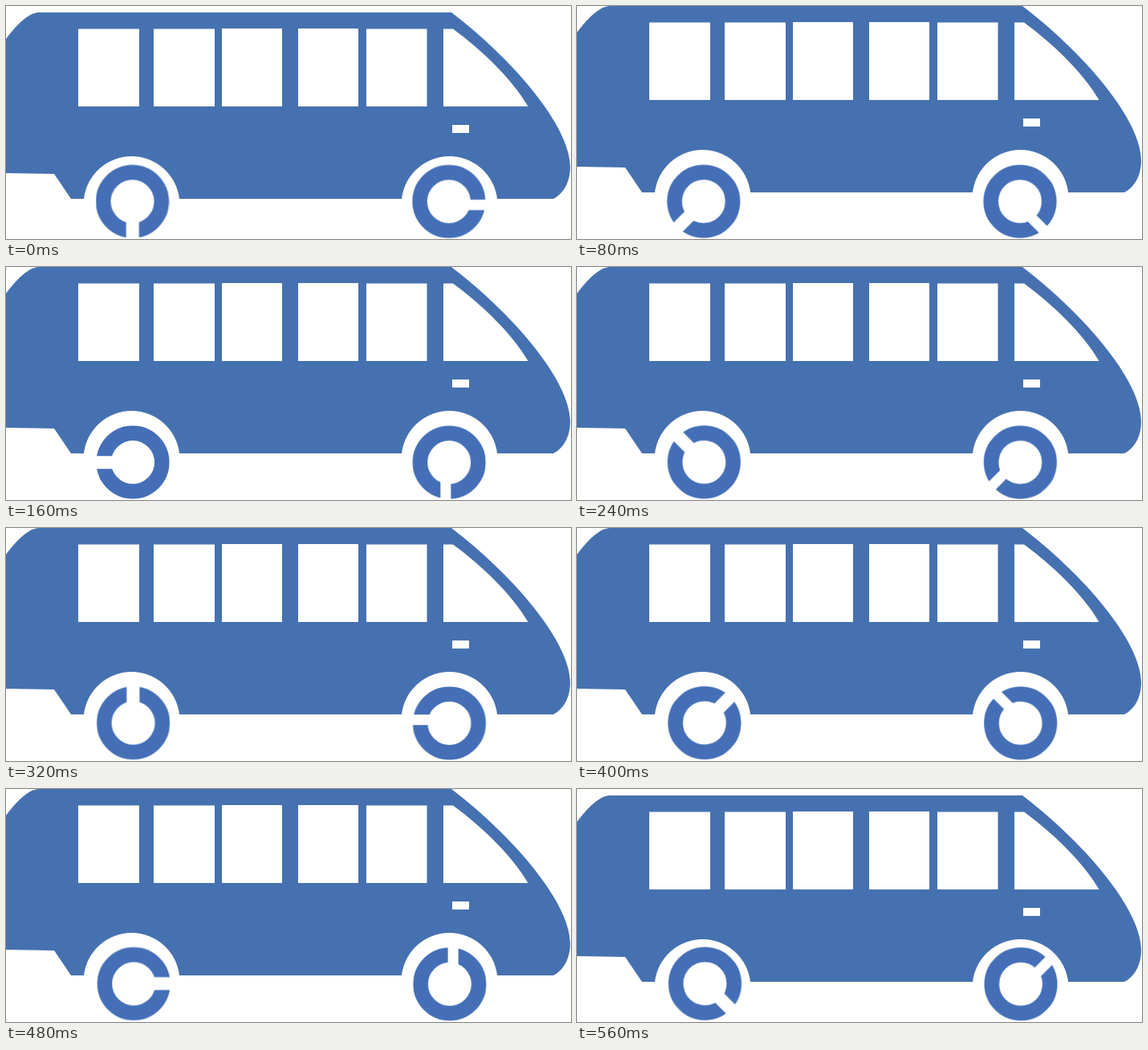
Animation, 704 px wide and 290 px high, one loop 640 ms. Source, as an HTML page:

```html
<!DOCTYPE html>
<html lang="en">
<head>
<meta charset="utf-8">
<title>Bus</title>
<style>
  html, body { margin: 0; width: 100%; height: 100%; overflow: hidden; background: #fff; }
  svg { display: block; width: 704px; height: 290px; }
  #body { fill: #4671b0; }
  #body .glass { fill: #fff; }
  .wheel circle { fill: none; stroke: #446fb7; stroke-width: 18.5; }
  .wheel rect { fill: #fff; }
</style>
</head>
<body>
<svg viewBox="0 0 704 290">
  <g id="body">
    <path d="M0 41 C12 25 27 8.5 41 8 H555 C630 65 703 149 703 200
             C703 220 694 234 682 240 H612 A59.9 59.9 0 0 0 493 240
             H216 A59.9 59.9 0 0 0 97 240 H81 L60 209 L0 208 Z"/>
    <path class="glass" d="M90 28.5h76V125h-76z M184 28.5h76V125h-76z M269 28h75V125h-75z
             M364 28h75V125h-75z M449 28.5h75.500V125h-75.500z
             M545 28.500H557 C592 54 630 90 650.500 125H545z M556 148h21v10h-21z"/>
  </g>
  <g class="wheel" id="rear">
    <circle r="36.250"/>
    <rect x="20" y="-8.250" width="28" height="16"/>
  </g>
  <g class="wheel" id="front">
    <circle r="36.250"/>
    <rect x="20" y="-2.250" width="28" height="13"/>
  </g>
</svg>
<script>
  const STEPS = 8;
  const timing = { duration: 640, iterations: Infinity };
  const byId = id => document.getElementById(id);

  // Each wheel turns 45 degrees per step while its hub creeps slightly.
  function spin(id, x, y, startAngle, driftX, driftY) {
    const pose = (px, py, angle) =>
      ({ transform: `translate(${px}px, ${py}px) rotate(${angle}deg)`, easing: `steps(${STEPS}, end)` });
    byId(id).animate(
      [pose(x, y, startAngle), pose(x + driftX, y + driftY, startAngle + 360)], timing);
  }

  const lift = (step, y) =>
    ({ offset: step / STEPS, transform: `translateY(${y}px)`, easing: 'steps(1, end)' });

  spin('rear', 157.5, 243.3, 90, 2.2, -1.2);
  spin('front', 551.8, 243.3, 0, 1.4, -0.6);
  byId('body').animate([lift(0, 0), lift(1, -8), lift(7, 0), lift(8, 0)], timing);
</script>
</body>
</html>
```
